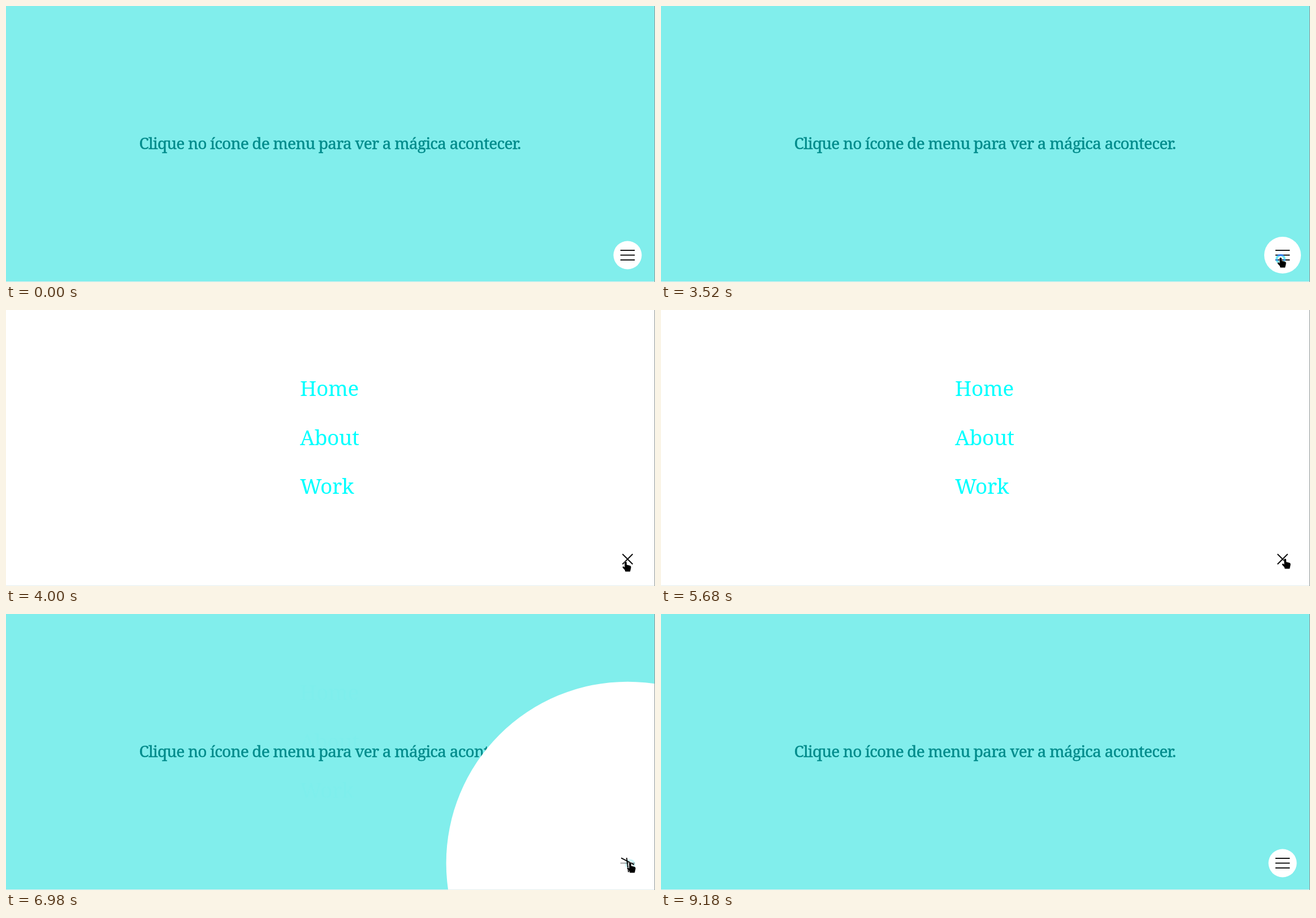
These frames come from a looping animation (1148 by 488 pixels, 9.23 s). An HTML page:

```html
<!DOCTYPE html>
<html lang="pt">
<head>
<meta charset="utf-8">
<title>Menu</title>
<style>
  html, body { margin: 0; width: 100%; height: 100%; overflow: hidden; background: #81eeec; }
  svg { display: block; width: 100%; height: 100%; }
  text { font-family: "Noto Serif", serif; }
  .headline { font-size: 28px; letter-spacing: -.81px; text-anchor: middle; fill: #008b8b; stroke: #008b8b; stroke-width: .45px; }
  #links { font-size: 37px; letter-spacing: -.4px; fill: #0ff; }
  #icon { stroke: #0b0b0b; stroke-width: 1.9px; }
  .ring { fill: none; stroke-width: 4px; }
  #glow { stroke: #2a7cf0; mix-blend-mode: lighten; }
  #arrow, #hand { fill: #000; stroke: #fff; stroke-width: 1px; stroke-linejoin: round; paint-order: stroke; }
</style>
</head>
<body>
<svg viewBox="0 0 1148 488" preserveAspectRatio="none">
  <rect width="1148" height="488" fill="#81eeec"/>
  <text class="headline" x="573" y="253">Clique no ícone de menu para ver a mágica acontecer.</text>
  <circle id="disc" cx="1099.5" cy="440.5" fill="#fff"/>
  <g id="links">
    <text x="520" y="152">Home</text>
    <text x="520" y="239">About</text>
    <text x="520" y="325">Work</text>
  </g>
  <circle id="ring" class="ring" r="7" stroke="#6fe5ee"/>
  <g id="icon">
    <path id="top" d="M-12.75 0h25.5"/>
    <path id="middle" d="M-12.75 0h25.5" transform="translate(1099.5 440.5)"/>
    <path id="bottom" d="M-12.75 0h25.5"/>
  </g>
  <circle id="glow" class="ring" r="7"/>
  <g id="cursor">
    <path id="arrow" d="M.5 .5V15H6.5L11 10.5Z"/>
    <path id="hand" d="M-1.8 1.5Q0 -1 1.8 1.5L2 6L8 7.5Q10 8 9.6 11L8 18H-.5L-1.5 15L-5.3 11Q-5.8 8.5 -3.5 9L-1.6 10.5Z"/>
  </g>
  <path d="M0 487.5H1147" stroke="#e4eeee"/>
  <path d="M1147.5 0V488" stroke="#8f9696"/>
</svg>
<script>
const LOOP = 9230, OPEN = 3540, CLOSE = 6783;
const CENTER = [1099.5, 440.5];
const $ = id => document.getElementById(id);
const clamp = v => Math.min(1, Math.max(0, v));
const set = (id, attrs) => {
  for (const name in attrs) $(id).setAttribute(name, attrs[name]);
};

// cubic-bezier(.19, 1, .22, 1)
function expoOut(x) {
  x = clamp(x);
  if (x === 0 || x === 1) return x;
  let low = 0, high = 1;
  for (let i = 0; i < 24; i++) {
    const s = (low + high) / 2, q = 1 - s;
    if (.57 * q * q * s + .66 * q * s * s + s ** 3 < x) low = s; else high = s;
  }
  return 1 - (1 - low) ** 3;
}

function inOut(x) {
  x = clamp(x);
  return x < .5 ? 2 * x * x : 1 - 2 * (1 - x) ** 2;
}

const openness = (t, ease, duration) => ease((t - OPEN) / duration) - ease((t - CLOSE) / duration);

// [start time, radius to move to]
const radii = [[2460, 32.5], [OPEN, 1250], [CLOSE, 32.5], [8310, 25]];
const radiusAt = t => radii.reduce((r, [start, to]) => r + (to - r) * expoOut((t - start) / 1000), 25);

// [time, x, y] of the pointer's hot spot
const route = [
  [610, 665, 93], [910, 672, 97],
  [1260, 895, 228], [1700, 985, 330], [2180, 1051, 398], [2260, 1057, 408],
  [2600, 1088, 436], [2900, 1096, 444.5], [4530, 1096, 444.5],
  [4690, 1074, 449], [4840, 1058, 453], [5030, 1058, 453],
  [5400, 1094, 445], [5680, 1104, 439.5], [8220, 1104, 439.5],
  [8500, 1010, 464], [8800, 896, 489]
];

function pointerAt(t) {
  const i = route.findIndex(point => point[0] > t);
  if (i < 1) return route[i < 0 ? route.length - 1 : 0].slice(1);
  const [t0, x0, y0] = route[i - 1], [t1, x1, y1] = route[i];
  const k = (t - t0) / (t1 - t0);
  return [x0 + (x1 - x0) * k, y0 + (y1 - y0) * k];
}

const press = (t, down, up) => clamp((t - down) / 80) * clamp(1 - (t - up) / 150);

function drawIcon(t) {
  const p = openness(t, inOut, 450), gap = 8.5 * (1 - p);
  const bar = (offset, angle) => ({ transform: `translate(${CENTER[0]} ${CENTER[1] + offset}) rotate(${angle})` });
  set("top", bar(-gap, 45 * p));
  set("bottom", bar(gap, 135 * p));
  set("middle", { opacity: 1 - p });
}

function drawPointer(t) {
  const [x, y] = pointerAt(t);
  const visible = (t >= 610 && t < 910) || (t >= 1260 && t < 8800);
  const onButton = Math.hypot(x - CENTER[0], y - CENTER[1]) < 27;
  set("cursor", { transform: `translate(${x} ${y})`, visibility: visible ? "visible" : "hidden" });
  set("arrow", { opacity: onButton ? 0 : 1 });
  set("hand", { opacity: onButton ? 1 : 0 });

  const first = press(t, 3150, 3560), second = press(t, 6710, 6880);
  const at = { cx: x, cy: y + 3 };
  set("ring", { ...at, opacity: Math.max(first, second) });
  set("glow", { ...at, opacity: first });
}

function draw(now) {
  const t = now % LOOP;
  set("disc", { r: radiusAt(t) });
  set("links", { opacity: openness(t, expoOut, 350) });
  drawIcon(t);
  drawPointer(t);
  requestAnimationFrame(() => draw(performance.now()));
}
draw(0);
</script>
</body>
</html>
```
